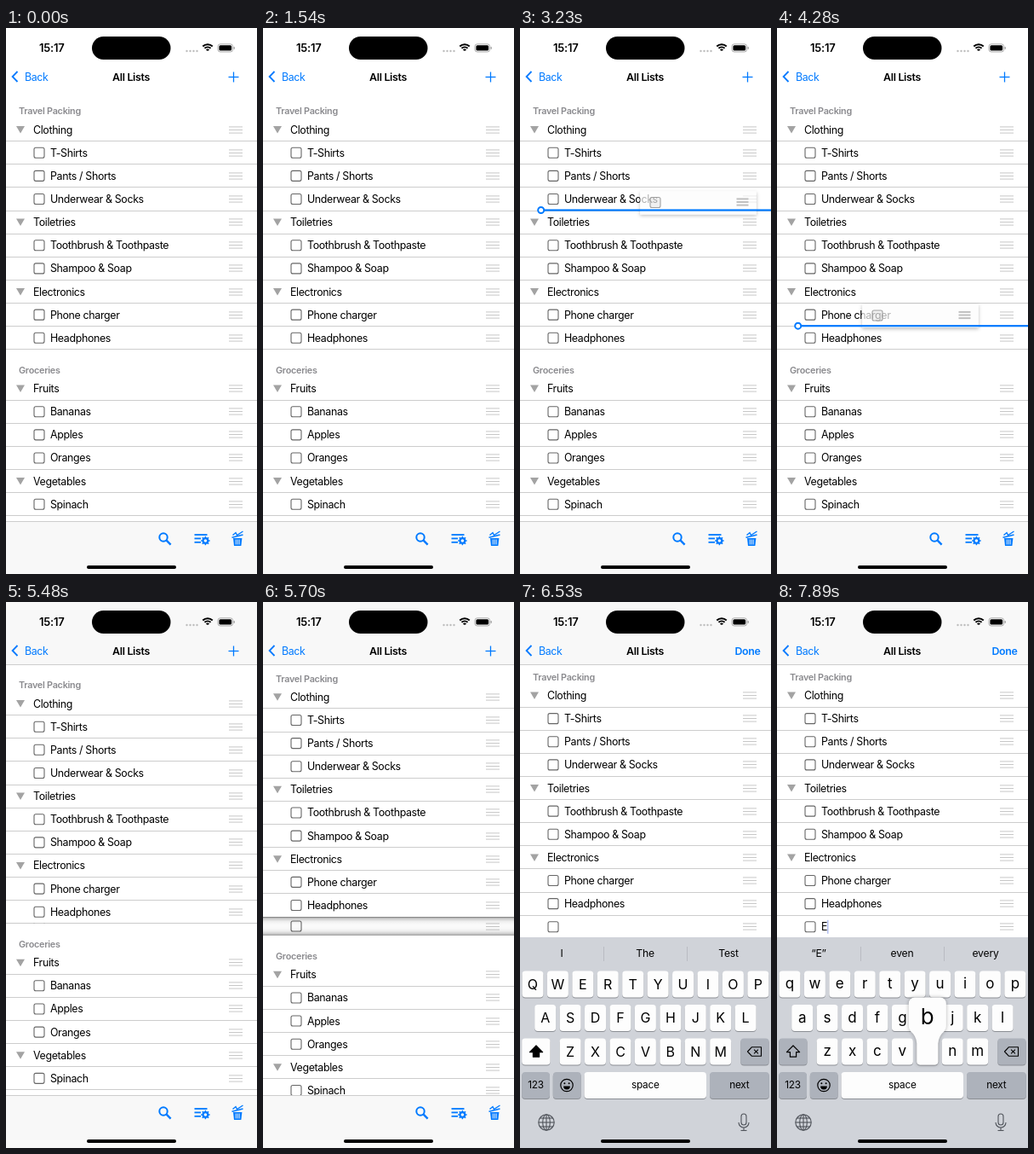
Animation, 295 px wide and 640 px high, one loop 8 s. Source, as an HTML page with a canvas:

```html
<!DOCTYPE html>
<html lang="en">
<head>
<meta charset="utf-8">
<title>Lists</title>
<style>
html, body { margin: 0; width: 100%; height: 100%; overflow: hidden; background: #fff; }
canvas { display: block; width: 295px; height: 640px; }
</style>
</head>
<body>
<canvas id="stage"></canvas>
<script>
const W = 295, H = 640, LOOP = 8000, ROW = 27.13, TAU = Math.PI * 2;
const LIFT = 2000, DROP = 5480, EDIT = 5840, PRESS_E = 6860, TYPED = 7100, PRESS_B = 7880;
const BLUE = '#007aff', BAR = '#f8f8f8', RULE = '#cdcdcd', GREY_KEY = '#adb2bb', KEY = '#fdfdfd';
const canvas = document.getElementById('stage');
const c = canvas.getContext('2d');
const dpr = window.devicePixelRatio || 1;
canvas.width = W * dpr;
canvas.height = H * dpr;

const sections = [
  { title: 'Travel Packing', groups: [
    ['Clothing', 'T-Shirts', 'Pants / Shorts', 'Underwear & Socks'],
    ['Toiletries', 'Toothbrush & Toothpaste', 'Shampoo & Soap'],
    ['Electronics', 'Phone charger', 'Headphones']] },
  { title: 'Groceries', groups: [
    ['Fruits', 'Bananas', 'Apples', 'Oranges'],
    ['Vegetables', 'Spinach']] }
];

const clamp = v => Math.max(0, Math.min(1, v));
const progress = (t, from, to) => clamp((t - from) / (to - from));
const easeOut = (k, power) => 1 - Math.pow(1 - k, power);

function move(t, from, to) {
  const k = progress(t, from, to);
  return k * k * (3 - 2 * k);
}

// Centre and scale of the dragged row: lift, two pulls downwards, a last nudge
function dragAt(t) {
  const lift = move(t, LIFT, 2400), first = move(t, 2530, 2860);
  const second = move(t, 3300, 3940), nudge = move(t, 4390, 4490);
  return {
    x: 266 - 40 * lift - 16.5 * first - 41 * second,
    y: 57 + 15 * lift + 133 * first + 132.5 * second + 25.5 * nudge,
    scale: 0.15 + 0.85 * lift
  };
}

function text(s, x, y, size = 12.4, { weight = 400, color = '#000', align = 'left', gap = -0.35 } = {}) {
  c.font = `${weight} ${size}px Inter, Roboto, sans-serif`;
  c.letterSpacing = gap + 'px';
  c.textAlign = align;
  c.fillStyle = color;
  c.fillText(s, x, y);
}

function rect(x, y, w, h, color) {
  c.fillStyle = color;
  c.fillRect(x, y, w, h);
}

function paint(fill, line, width = 1) {
  if (fill) { c.fillStyle = fill; c.fill(); }
  if (line) { c.strokeStyle = line; c.lineWidth = width; c.stroke(); }
}

function round(x, y, w, h, r, fill, line, width) {
  c.beginPath();
  c.roundRect(x, y, w, h, r);
  paint(fill, line, width);
}

function arc(x, y, r, fill, line, width, from = 0, to = TAU) {
  c.beginPath();
  c.arc(x, y, r, from, to);
  paint(fill, line, width);
}

function path(x, y, points, fill, line, width, close = false) {
  c.beginPath();
  for (const [dx, dy] of points) c.lineTo(x + dx, y + dy);
  if (close) c.closePath();
  paint(fill, line, width);
}

const line = (x1, y1, x2, y2, color, width) => path(0, 0, [[x1, y1], [x2, y2]], null, color, width);
const rule = (y, color = RULE) => rect(0, Math.floor(y), W, 1, color);

function box(x, y, fill, color) {
  round(x - 6, y - 6, 12, 12, 2, fill, color, 1.1);
}

function handle(x, y, half, color, width) {
  for (const d of [-3.6, 0, 3.6]) line(x - half, y + d, x + half, y + d, color, width);
}

function listRow(name, y, isGroup) {
  if (isGroup) path(17, y, [[-5, -4], [5, -4], [0, 4.5]], '#a3a3a3');
  else box(39, y, null, '#666');
  text(name, isGroup ? 32 : 52, y + 4.5);
  handle(270, Math.floor(y) + 0.5, 8, '#c8c8c8', 1);
  rule(y + ROW / 2);
}

function newRow(top, p, t) {
  const h = ROW * p, typed = t >= TYPED;
  c.save();
  c.beginPath();
  c.rect(0, top, W, h);
  c.clip();
  listRow(typed ? 'E' : '', top + h / 2, false);
  if (t < EDIT) {
    const shade = c.createLinearGradient(0, top, 0, top + h);
    for (let u = 0; u <= 1; u += 0.125)
      shade.addColorStop(u, `rgba(0,0,0,${0.02 + 0.36 * Math.abs(2 * u - 1) ** 3})`);
    rect(0, top, W, h, shade);
  } else {
    c.globalAlpha = clamp(0.5 + 2 * Math.cos(TAU * (t - 6000) / 1086));
    rect(typed ? 59 : 51.5, top + h / 2 - 8, 1.5, 16, '#3a5bd9');
  }
  c.restore();
  if (p === 1) rule(top + h - 0.2);
}

function list(p, t) {
  let y = 97.5 - 9.6 * p;
  sections.forEach((s, n) => {
    text(s.title, 15, y + 3.9, 10.8, { weight: 600, color: '#8a8a8e', gap: -0.25 });
    y += 21.6;
    for (const group of s.groups)
      group.forEach((name, i) => { listRow(name, y, i === 0); y += ROW; });
    if (n === 0 && p > 0) {
      newRow(y - ROW / 2, p, t);
      y += ROW * p;
    }
    y += 10.6;
  });
}

function statusBar() {
  text('15:17', 53.7, 28, 13, { weight: 600, align: 'center', gap: -0.2 });
  round(101, 10, 92.5, 27, 13.5, '#000');
  for (let i = 0; i < 4; i++) arc(212.5 + i * 4, 27, 1.2, '#bdbdbd');
  for (const r of [8.4, 5.2, 2])
    arc(237, 27.6, r, null, '#000', 1.9, -TAU * 0.37, -TAU * 0.13);
  round(249, 18.8, 17.6, 9.2, 2.8, null, '#999', 0.8);
  round(250.4, 20.2, 14.8, 6.4, 1.6, '#000');
  round(267.6, 21.9, 1.2, 3, 0.6, '#999');
}

function header(p, t) {
  rect(0, 0, W, 73, p > 0 ? BAR : '#fff');
  if (p > 0) rule(73);
  statusBar();
  path(7.6, 57, [[5.9, -6], [0, 0], [5.9, 6]], null, BLUE, 1.8);
  text('Back', 22, 61.5, 12.4, { color: BLUE });
  text('All Lists', 147, 61.5, 12.4, { weight: 600, align: 'center', gap: -0.3 });
  if (t >= EDIT) {
    text('Done', 252.5, 61.5, 12.4, { weight: 600, color: BLUE });
  } else {
    c.globalAlpha = t >= 1800 && t < 2300 ? 0.4 : 1;
    line(261.5, 57.5, 273.5, 57.5, BLUE, 1.3);
    line(267.5, 51.5, 267.5, 63.5, BLUE, 1.3);
    c.globalAlpha = 1;
  }
}

function toolbar() {
  rect(0, 579, W, 61, BAR);
  rule(578.5);

  arc(185, 597, 4.7, null, BLUE, 2);
  line(188.4, 600.4, 193.6, 605.6, BLUE, 2.4);

  for (let i = 0; i < 3; i++) line(221.5, 594 + 4.4 * i, i ? 229 : 236.5, 594 + 4.4 * i, BLUE, 1.8);
  arc(234.4, 601, 2.9, null, BLUE, 2.2);
  for (let a = 0; a < TAU; a += TAU / 8) {
    const x = Math.cos(a), y = Math.sin(a);
    line(234.4 + x * 3.5, 601 + y * 3.5, 234.4 + x * 5.2, 601 + y * 5.2, BLUE, 1.5);
  }

  path(272.2, 607, [[-5.2, -9], [5.2, -9], [4.2, 0], [-4.2, 0]], BLUE);
  for (const d of [-2, 0, 2]) line(272.2 + d, 599.5, 272.2 + d, 605.5, BAR, 0.9);
  line(265.5, 597.2, 278.5, 594, BLUE, 1.4);
  path(266.5, 594.5, [[0, 0], [3.5, -3], [5, 0], [12, -4.5]], null, BLUE, 1.4);
}

function preview(t) {
  const { x, y, scale } = dragAt(t), w = 136.6, h = 27.2;
  c.save();
  c.translate(x, y);
  c.scale(scale, scale);
  // The shadow stays outside the see-through row
  c.save();
  c.beginPath();
  c.rect(-W, -H, 2 * W, 2 * H);
  c.rect(-w / 2, -h / 2, w, h);
  c.clip('evenodd');
  c.shadowColor = 'rgba(0,0,0,0.25)';
  c.shadowBlur = 4 * dpr;
  c.shadowOffsetY = 1.5 * dpr;
  rect(-w / 2, -h / 2, w, h, '#fff');
  c.restore();
  rect(-w / 2, -h / 2, w, h, 'rgba(252,252,252,0.7)');
  box(-50.5, -0.5, 'rgba(0,0,0,0.05)', '#a0a0a0');
  handle(52, -1, 7, '#c0c0c0', 2);
  c.restore();
}

// The marker snaps to row edges and trails the finger
function dropLine(t) {
  const top = 105.6, row = Math.floor((dragAt(t - 240).y - top) / ROW);
  if (row < 0) return;
  const y = top + ROW * (row + 1) - 0.6;
  rect(28, y - 1.1, W - 28, 2.2, BLUE);
  arc(24.7, y, 3.5, '#fff', BLUE, 2);
}

function key(x, y, w, color) {
  round(x, y + 1, w, 31, 4, '#8b8e94');
  round(x, y, w, 31, 4, color);
}

function popup(x, y, label) {
  c.save();
  c.shadowColor = 'rgba(0,0,0,0.3)';
  c.shadowBlur = 4 * dpr;
  c.beginPath();
  c.roundRect(x - 22, y - 48, 44, 41, 7);
  c.moveTo(x - 20.5, y - 9);
  c.lineTo(x + 20.5, y - 9);
  c.quadraticCurveTo(x + 13, y - 3, x + 12.5, y + 6);
  c.lineTo(x - 12.5, y + 6);
  c.quadraticCurveTo(x - 13, y - 3, x - 20.5, y - 9);
  c.roundRect(x - 12.5, y - 4, 25, 35, 4);
  paint(KEY);
  c.restore();
  text(label, x, y - 16.5, 26, { align: 'center', gap: 0 });
}

function shiftIcon(x, y, filled) {
  const half = [[0, -7], [7.6, 0.6], [3.6, 0.6], [3.6, 6.2]];
  const mirror = half.slice(1).reverse().map(([dx, dy]) => [-dx, dy]);
  path(x, y, half.concat(mirror), filled && '#000', '#000', 1.2, true);
}

function backspaceIcon(x, y) {
  path(x, y, [[-8, 0], [-3, -5.3], [8, -5.3], [8, 5.3], [-3, 5.3]], null, '#000', 1.1, true);
  for (const s of [-1, 1]) line(x - 0.4, y - 2.4 * s, x + 4.4, y + 2.4 * s, '#000', 1.1);
}

function smileIcon(x, y) {
  arc(x, y, 7.2, null, '#000', 1.2);
  for (const s of [-1, 1]) arc(x + 2.6 * s, y - 2.2, 1, '#000');
  arc(x, y + 1, 3.9, '#000', null, 0, 0, Math.PI);
}

function globeIcon(x, y, color) {
  arc(x, y, 9.2, null, color, 1.1);
  c.beginPath();
  c.ellipse(x, y, 4.3, 9.2, 0, 0, TAU);
  paint(null, color, 1.1);
  line(x, y - 9.2, x, y + 9.2, color, 1.1);
  for (const d of [-5, 0, 5]) {
    const half = Math.sqrt(9.2 ** 2 - d * d);
    line(x - half, y + d, x + half, y + d, color, 1.1);
  }
}

function micIcon(x, y, color) {
  round(x - 3, y - 10, 6, 13, 3, null, color, 1.1);
  arc(x, y, 6, null, color, 1.1, 0, Math.PI);
  line(x, y + 6, x, y + 9.5, color, 1.1);
  line(x - 3.5, y + 9.5, x + 3.5, y + 9.5, color, 1.1);
}

function keyboard(t) {
  const top = 393 + 247 * (1 - easeOut(progress(t, 5730, 6530), 3.5));
  const upper = t < TYPED;
  const rowY = i => top + 39.5 * (i + 1);
  const center = { align: 'center', gap: -0.2 };
  rect(0, top, W, H - top, '#d0d3d9');
  const words = upper ? ['I', 'The', 'Test'] : ['“E”', 'even', 'every'];
  words.forEach((word, i) => {
    text(word, 49 + 98 * i, top + 23.2, 12.2, center);
    if (i) rect(98 * i, top + 11, 0.8, 17, '#b3b6bd');
  });

  const pressed = t >= PRESS_B ? 'b' : t >= PRESS_E && t < TYPED ? 'e' : '';
  let pop = null;
  ['qwertyuiop', 'asdfghjkl', 'zxcvbnm'].forEach((letters, r) => {
    [...letters].forEach((ch, i) => {
      const x = 147.4 + 29.43 * (i - (letters.length - 1) / 2), y = rowY(r);
      const label = upper ? ch.toUpperCase() : ch;
      key(x - 12.5, y, 25, KEY);
      text(label, x, y + (upper ? 21.3 : 20.6), upper ? 16 : 17, { align: 'center', gap: 0 });
      if (ch === pressed) pop = [x, y, label];
    });
  });

  key(2.2, rowY(2), 33.3, upper ? KEY : GREY_KEY);
  key(259.3, rowY(2), 33.3, GREY_KEY);
  key(2.2, rowY(3), 32.8, GREY_KEY);
  key(38.8, rowY(3), 32.8, GREY_KEY);
  key(75.5, rowY(3), 143.5, KEY);
  key(223, rowY(3), 69.8, GREY_KEY);
  text('123', 18.5, rowY(3) + 19.4, 11.8, center);
  text('space', 147.3, rowY(3) + 19.4, 11.8, center);
  text('next', 257.8, rowY(3) + 19.4, 11.8, center);

  c.lineJoin = 'round';
  shiftIcon(19, top + 134, upper);
  backspaceIcon(275.5, top + 134);
  smileIcon(55, top + 173.5);
  globeIcon(31, top + 217, '#50545b');
  micIcon(263, top + 217, '#50545b');
  c.lineJoin = 'miter';
  if (pop) popup(...pop);
}

function draw(now) {
  const t = now % LOOP;
  const p = easeOut(progress(t, DROP, EDIT), 1.75);
  c.setTransform(dpr, 0, 0, dpr, 0, 0);
  rect(0, 0, W, H, '#fff');
  list(p, t);
  header(p, t);
  toolbar();
  if (t >= LIFT && t < DROP) {
    preview(t);
    dropLine(t);
  }
  if (t >= EDIT) keyboard(t);
  round(95, 630, 105, 4, 2, '#000');
  requestAnimationFrame(draw);
}
requestAnimationFrame(draw);
</script>
</body>
</html>
```
